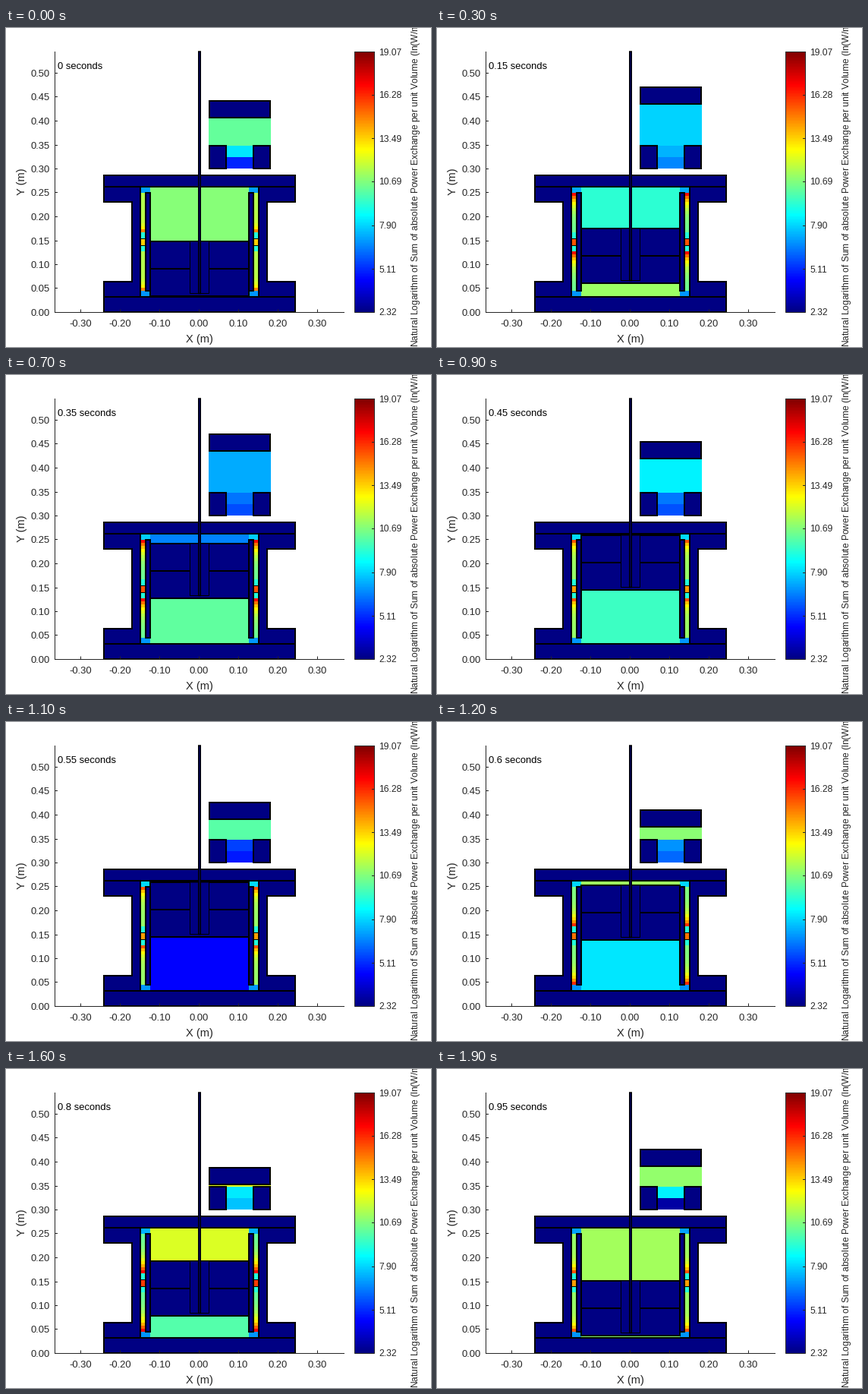
Animation of 560x420 px, one loop 2000 ms. Source, as a matplotlib script:

```python
import numpy as np
import matplotlib.pyplot as plt
from matplotlib.animation import FuncAnimation
from matplotlib.patches import Polygon, Rectangle

W, H, DPI = 560, 420, 100
FRAMES, STEP = 20, 100
PX = 72 / DPI
INK = "#262626"
MID, FLOOR = 255, 374.5            # centre line and floor of the machine
BORE_TOP, BORE_BOT = 209, 354
CELL_TOP, CELL_BOT = 217, 346

plt.rcParams["font.family"] = "Liberation Sans"
plt.rcParams["path.snap"] = False


def jet(v):
    """256-step jet palette for values in 0..1."""
    u = np.clip(np.floor(np.asarray(v, float) * 256) + 1, 1, 256) / 256
    return np.clip(1.5 - np.abs(4 * u[..., None] - [3, 2, 1]), 0, 1)


NAVY = jet(0)

fig = plt.figure(figsize=(W / DPI, H / DPI), dpi=DPI, facecolor="white")
ax = fig.add_axes([0, 0, 1, 1])
ax.axis("off")


def box(x0, y0, x1, y1, color=NAVY, lw=2, z=3, edge="black"):
    return ax.add_patch(Rectangle((x0, y0), x1 - x0, y1 - y0, facecolor=color,
                                  edgecolor=edge if lw else "none",
                                  linewidth=lw * PX, zorder=z,
                                  joinstyle="miter"))


def gas(x0, y0, x1, y1, z=1):
    return box(x0, y0, x1, y1, lw=0, z=z)


def pair(make, dx0, y0, dx1, y1, **kw):
    """The same box on both sides of the centre line."""
    return [make(MID - dx1, y0, MID - dx0, y1, **kw),
            make(MID + dx0, y0, MID + dx1, y1, **kw)]


def span(patch, y0, y1):
    patch.set_y(y0)
    patch.set_height(max(y1 - y0, 0))


def line(xs, ys, color=INK, lw=1, z=6):
    return ax.plot(xs, ys, color=color, lw=lw * PX, zorder=z,
                   solid_capstyle="butt")[0]


def text(x, y, s, size=13, ha="left", color=INK, rot=0):
    return ax.text(x, y, s, fontsize=size * PX, ha=ha, va="baseline",
                   color=color, rotation=rot, rotation_mode="anchor", zorder=8)


# axes and labels
line([64.5, 64.5], [31, 375])
line([64, 446], [FLOOR, FLOOR])
for k in range(-3, 4):
    x = round(254 + 52.1 * k) + 0.5
    line([x, x], [FLOOR, FLOOR - 4])
    text(x, 393, f"{k / 10:.2f}", ha="center")
for k in range(11):
    y = round(374 - 31.5 * k) + 0.5
    line([64, 68], [y, y])
    text(58, y + 4.6, f"{k * 0.05:.2f}", ha="right")
text(255, 414, "X (m)", 14.67, "center")
text(25, 202.5, "Y (m)", 14.67, "center", rot=90)
clock = text(68, 54, "", color="black")

# colour bar
ax.imshow(jet(np.linspace(1, 0, 256))[:, None, :], aspect="auto",
          extent=(459, 486, 374, 31), interpolation="nearest", zorder=2)
box(459.5, 31.5, 485.5, 374.5, "none", lw=1, z=5, edge=INK)
for k in range(7):
    y = round(374 - 343 / 6 * k) + 0.5
    line([482, 485], [y, y])
    text(491, y + 4, f"{2.318 + 2.7918 * k:.2f}", 12)
text(544, 419.5, "Natural Logarithm of Sum of absolute Power Exchange "
     "per unit Volume (ln(W/m$^3$))", 12, rot=90)

# fixed casing
box(129, 194, 381, BORE_TOP)
box(129, BORE_BOT, 381, 374)
for side in (-1, 1):
    outline = [(78, BORE_TOP), (126, BORE_TOP), (126, 229), (89, 229),
               (89, 334), (126, 334), (126, BORE_BOT), (78, BORE_BOT)]
    ax.add_patch(Polygon([(MID + side * dx, y) for dx, y in outline],
                         facecolor=NAVY, edgecolor="black",
                         linewidth=2 * PX, zorder=3))
pair(box, 65, 217, 71, 346, z=5)
box(268, 155, 290, 185)
box(326, 155, 348, 185)

# gas spaces
top_gas = gas(189, BORE_TOP, 321, 281)
low_gas = gas(189, 353, 321, BORE_BOT)
top_ports = pair(gas, 65, BORE_TOP, 78, 217, z=2)
low_ports = pair(gas, 65, 346, 78, BORE_BOT, z=2)
work_gas = gas(267, 118, 349, 155)
neck_up = gas(290, 155, 326, 170)
neck_low = gas(290, 170, 326, 185)

# heat exchanger channels
blank = np.ones((CELL_BOT - CELL_TOP, 1, 3))
channels = []
for x in (177, 326):
    channels.append(ax.imshow(blank, aspect="auto", interpolation="nearest",
                              extent=(x, x + 7, CELL_BOT, CELL_TOP), zorder=2))
    for y in (277.5, 286.5):
        line([x, x + 7], [y, y], "black")

# moving parts
body = box(190, 281, 320, 353)
decks = [line(xs, [0, 0], "black", 2) for xs in ([190, 242], [268, 320])]
hub = box(242.5, 281, 267.5, 349, lw=1, z=4)
rod = box(253.75, 31, 256.25, 349, lw=1.5, z=7)
work_piston = box(268, 96, 348, 118)

ax.set_xlim(0, W)
ax.set_ylim(H, 0)


def dip(t, at, depth):
    """Narrow drop of a log level where the power changes sign."""
    d = (t - at + 0.5) % 1 - 0.5
    return depth * np.exp(-(d / 0.04) ** 2)


def channel(t, speed):
    """Colours down a channel, hottest where the gas flows in."""
    y = np.arange(CELL_TOP, CELL_BOT) + 0.5
    v = np.full(y.size, 0.41)
    tail, peak = 0.55 - 0.1 * speed, 0.74 + 0.15 * speed
    for y0, y1 in ((CELL_TOP, 269), (294, CELL_BOT)):
        part = (y > y0) & (y < y1)
        d = y[part] - y0 if 0 < t < 0.58 else y1 - y[part]
        d = d // 4 * 4
        v[part] = tail + (peak - tail) * np.exp(-d / (5 + 10 * speed))
    v[(y > 277) & (y < 287)] = 0.67 + 0.15 * speed
    return jet(v)[:, None, :]


def draw(i):
    t = i / FRAMES
    c, s, c2 = (np.cos(2 * np.pi * t), np.sin(2 * np.pi * t),
                np.cos(4 * np.pi * t))

    # crank motion: displacer, and work piston a quarter turn behind
    top = round(243.5 + 36 * c + 1.8 * c2)
    base = round(122 - 28.5 * s - 3.8 * c2)
    bottom = min(top + 72, BORE_BOT)
    span(body, top, bottom)
    span(hub, top, top + 68.5)
    span(rod, 31, top + 68.5)
    for deck in decks:
        deck.set_ydata([top + 36, top + 36])
    span(work_piston, base - 22, base)
    span(top_gas, BORE_TOP, top)
    span(low_gas, bottom, BORE_BOT)
    span(work_gas, base, 155)

    neck = 0.30 + 0.05 * c - 0.04 * s - dip(t, 0.55, 0.08)
    levels = [
        ([work_gas], 0.44 + 0.03 * c - 0.16 * s),
        ([top_gas], 0.485 + 0.02 * c - 0.1 * s - dip(t, 0.35, 0.14)),
        ([low_gas], 0.47 + 0.05 * c + 0.03 * s - dip(t, 0.55, 0.29)),
        ([neck_up], neck),
        ([neck_low], neck - 0.04 - dip(t, 0.965, 0.33)),
        (top_ports, 0.31 - 0.03 * c),
        (low_ports, 0.27),
    ]
    for patches, level in levels:
        for p in patches:
            p.set_facecolor(jet(level))

    cells = channel(t, abs(s))
    for strip in channels:
        strip.set_data(cells)
    clock.set_text(f"{round(t, 2):g} seconds")
    return []


anim = FuncAnimation(fig, draw, frames=FRAMES, interval=STEP, repeat=True,
                     repeat_delay=0, init_func=lambda: draw(0), blit=False)
plt.show()
```
